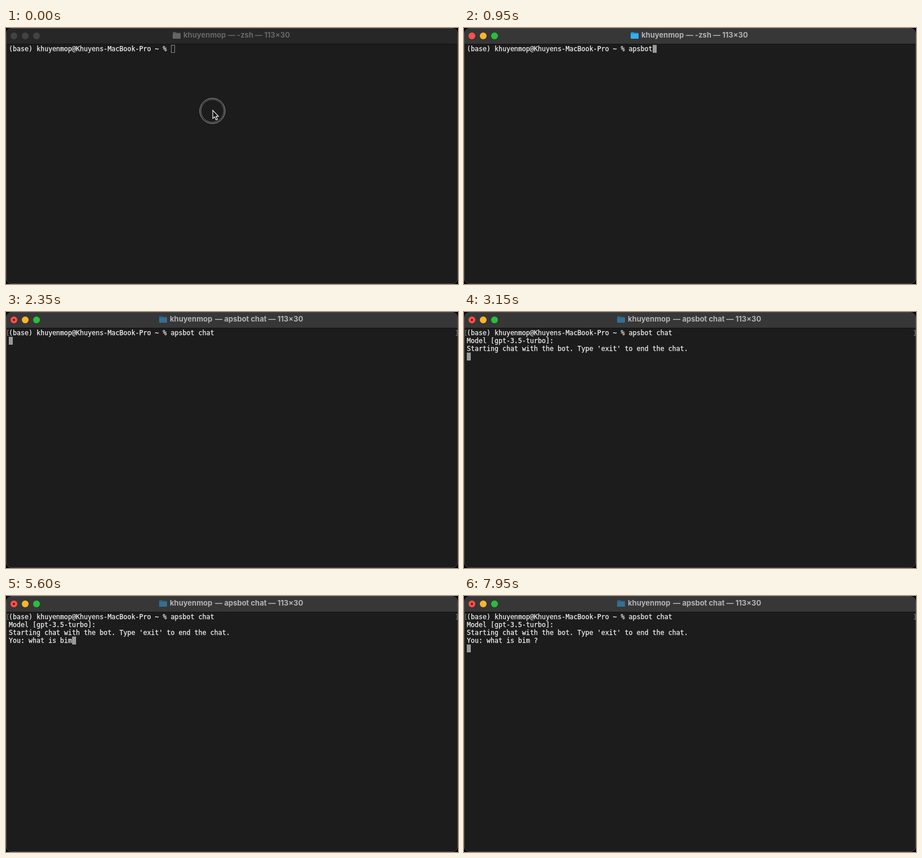
An HTML page for the animation above (8000 ms loop, 800x454 px).

```html
<!DOCTYPE html>
<html lang="en">
<head>
<meta charset="utf-8">
<title>Terminal chat</title>
<style>
  html, body { margin: 0; width: 100%; height: 100%; overflow: hidden; background: #000; }
  #stage { position: relative; width: 800px; height: 454px; overflow: hidden; background: #050505; }
  #stage * { position: absolute; box-sizing: border-box; }
  #window { inset: 0; border: 1px solid #4c4c4c; border-radius: 10px; background: #1c1c1c; overflow: hidden; }
  #bar { left: 0; top: 0; width: 100%; height: 28px; background: #373737; border-bottom: 1px solid #111; }
  .idle #bar { background: #272727; }
  .light { top: 8px; width: 12px; height: 12px; border-radius: 50%; }
  .idle .light { background: #434343 !important; }
  #edited { left: 4px; top: 4px; width: 4px; height: 4px; border-radius: 50%; background: #7d0d08; }
  .title { top: 4px; font: 700 13px/17px Inter, "Open Sans", sans-serif; color: #b3b3b3; white-space: pre; }
  .idle .title { color: #676767; }
  #folder { top: 7px; }
  pre { left: 5px; top: 30px; margin: 0; font: 11.628px/14px "DejaVu Sans Mono", monospace;
        color: #f2f2f2; -webkit-text-stroke: .25px #f2f2f2; }
  #caret { width: 7px; height: 14px; background: #999; }
  .idle #caret { background: none; border: 1px solid #8c8c8c; }
  .bracket { top: 32px; width: 3px; height: 10px; border: 1px solid #777; }
  svg { left: 0; top: 0; overflow: visible; fill: none; }
</style>
</head>
<body>
<div id="stage">
  <div id="window"></div>
  <div id="bar" style="left:1px;top:1px;width:798px;border-radius:9px 9px 0 0"></div>
  <div class="light" style="left:8px;background:#fe5049"><i id="edited"></i></div>
  <div class="light" style="left:28px;background:#fdb52a"></div>
  <div class="light" style="left:48px;background:#29bf3c"></div>
  <svg id="folder" width="14" height="12">
    <path id="back" d="M0 1.5Q0 0 1.5 0H5L6.5 1.5H12.5Q14 1.5 14 3V6H0Z"/>
    <rect id="front" y="3" width="14" height="9" rx="1.3"/>
  </svg>
  <span class="title" id="user">khuyenmop</span>
  <span class="title" id="task"></span>
  <pre id="text"></pre>
  <div id="caret"></div>
  <div class="bracket" style="left:2px;border-right:0"></div>
  <div class="bracket" style="left:796px;border-left:0"></div>
  <svg width="800" height="454">
    <g id="ring" stroke="#a5a5a5">
      <circle cx="365.3" cy="147" r="22.4"/><circle cx="365.3" cy="147" r="20.2" stroke="#777"/>
    </g>
    <path id="arrow" d="M366 146V160.5L369.3 157.5L371.8 163L374.3 162L371.9 156.6H376Z"
          fill="#111" stroke="#f4f4f4" stroke-width="1.2"/>
    <g id="beam" stroke-linecap="round">
      <path id="beamOuter" stroke="#e2e2e2" stroke-width="3.4"/>
      <path id="beamInner" stroke="#222" stroke-width="1.3"/>
    </g>
  </svg>
</div>
<script>
const LOOP = 8000, ACTIVE = 100, RUN = 2050;
const $ = id => document.getElementById(id);

// Each entry appends its text to the terminal at the given time.
const output = [
  [0, "(base) khuyenmop@Khuyens-MacBook-Pro ~ % "],
  [400, "a"], [500, "p"], [600, "s"], [650, "b"], [750, "o"], [800, "t"],
  [1150, " "], [1250, "c"], [1300, "h"], [1400, "a"], [1500, "t"],
  [2000, "\n"], [2400, "Model [gpt-3.5-turbo]: "], [2700, "\n"],
  [2900, "Starting chat with the bot. Type 'exit' to end the chat.\n"],
  [3550, "You: "],
  [4250, "w"], [4300, "h"], [4400, "a"], [4450, "t"], [4600, " "],
  [4750, "i"], [4850, "s"], [5000, " "],
  [5350, "b"], [5400, "i"], [5600, "m"], [5800, " "], [6000, "?"],
  [6300, "\n"]
];

const beamPath = "M362.5 139.5Q366 139.5 366 142.5V152.5Q366 155.5 362.5 155.5" +
  "M369.5 139.5Q366 139.5 366 142.5M366 152.5Q366 155.5 369.5 155.5M364.5 148.5H367.5";
$("beamOuter").setAttribute("d", beamPath);
$("beamInner").setAttribute("d", beamPath);

const show = (el, on) => { el.style.visibility = on ? "visible" : "hidden"; };

function render(t) {
  const idle = t < ACTIVE, running = t >= RUN;
  $("stage").className = idle ? "idle" : "";

  const text = output.filter(([at]) => t >= at).map(([, s]) => s).join("");
  const lines = text.split("\n");
  if ($("text").textContent !== text) $("text").textContent = text;
  $("caret").style.left = 5 + 7 * lines.at(-1).length + "px";
  $("caret").style.top = 30 + 14 * (lines.length - 1) + "px";

  $("folder").style.left = (running ? 271 : 295) + "px";
  $("back").style.fill = idle ? "#585858" : running ? "#285f80" : "#168bc9";
  $("front").style.fill = idle ? "#656565" : running ? "#326f92" : "#36aee9";
  $("user").style.left = (running ? 290 : 314) + "px";
  $("task").style.right = (running ? 274 : 297.5) + "px";
  $("task").textContent = `— ${running ? "apsbot chat" : "-zsh"} — 113×30`;
  show($("edited"), running);
  document.querySelectorAll(".bracket").forEach(b => show(b, t >= 2000));

  show($("arrow"), idle);
  show($("beam"), !idle && t < 400);
  $("ring").style.opacity = Math.max(0, 1 - t / 150);
}

const start = performance.now();
function tick() {
  render((performance.now() - start) % LOOP);
  requestAnimationFrame(tick);
}
tick();
</script>
</body>
</html>
```
